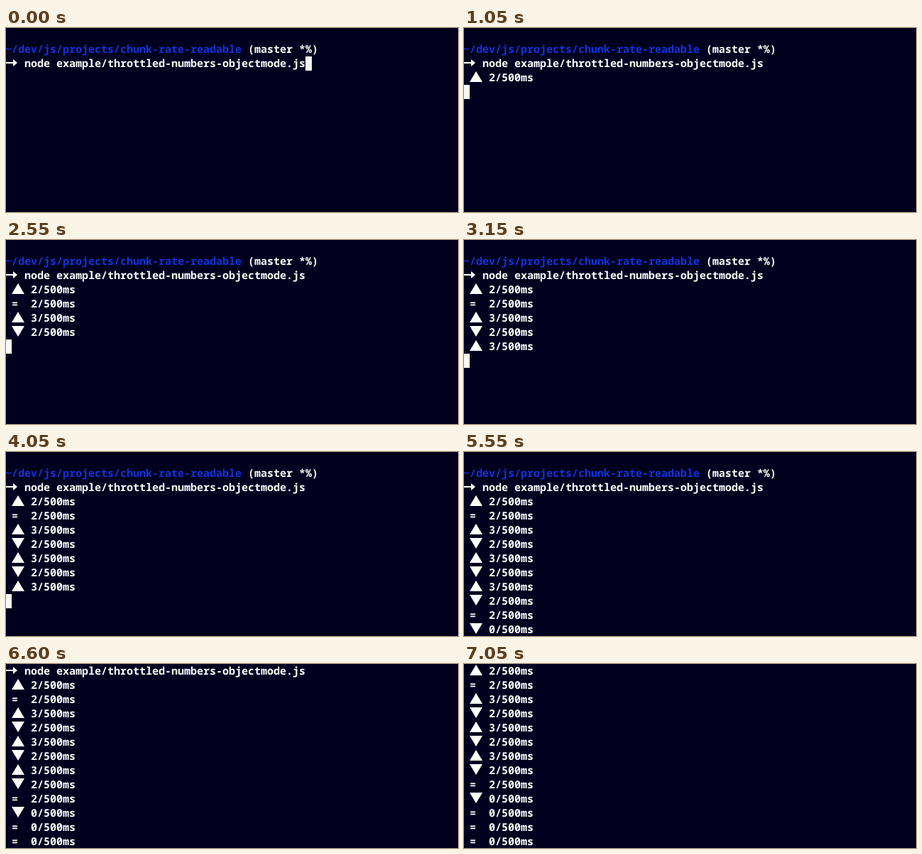
Recreate the animation shown at these times as an HTML page. Size 637 px wide and 259 px high, loop 7.6 s.

```html
<!DOCTYPE html>
<html lang="en">
<head>
<meta charset="utf-8">
<title>Chunk rate</title>
<style>
html, body { margin: 0; width: 100%; height: 100%; overflow: hidden; background: #00001e; }
svg { display: block; }
text { font: 600 15px "Noto Sans Mono", "DejaVu Sans Mono", monospace; white-space: pre; text-rendering: geometricPrecision; }
</style>
</head>
<body>
<svg width="637" height="259" viewBox="0 0 637 259" fill="#fff">
  <g id="screen">
    <text x="-1" y="35"><tspan fill="#1034dc">~/dev/js/projects/chunk-rate-readable</tspan> (master *%)</text>
    <path d="M0 48h10v-4l6 5-6 5v-4H0z"/>
    <text x="26" y="55">node example/throttled-numbers-objectmode.js</text>
    <rect id="cursor" width="9" height="20" fill="#f8f8f8"/>
  </g>
</svg>
<script>
const LOOP = 7600, ROW = 20, FIRST = 3, VISIBLE = 13;
const times = [600, 1050, 1650, 2100, 2550, 3150, 3600, 4050, 4650, 5100, 5550, 6150, 6600, 7050];
const rates = '^2 =2 ^3 v2 ^3 v2 ^3 v2 =2 v0 =0 =0 =0'.split(' ');
const marks = {
  '^': '<path d="M17 1l9 15H8z"/>',
  'v': '<path d="M8 1h18l-9 15z"/>',
  '=': '<text x="8" y="15">=</text>'
};
const screen = document.getElementById('screen');
const cursor = document.getElementById('cursor');

const rows = rates.map(([mark, count], i) => {
  const row = document.createElementNS('http://www.w3.org/2000/svg', 'g');
  row.setAttribute('transform', `translate(0 ${(FIRST + i) * ROW})`);
  row.innerHTML = `${marks[mark]}<text x="35" y="15">${count}/500ms</text>`;
  return screen.appendChild(row);
});

function draw() {
  const now = performance.now() % LOOP;
  const step = times.filter(t => t <= now).length;
  const printed = step - 1;
  const scroll = Math.max(0, FIRST + printed - VISIBLE);
  rows.forEach((row, i) => row.setAttribute('visibility', i < printed ? 'visible' : 'hidden'));
  cursor.setAttribute('x', step ? -1 : 422);
  cursor.setAttribute('y', (FIRST + printed) * ROW);
  screen.setAttribute('transform', `translate(0 ${-scroll * ROW})`);
  requestAnimationFrame(draw);
}
draw();
</script>
</body>
</html>
```
